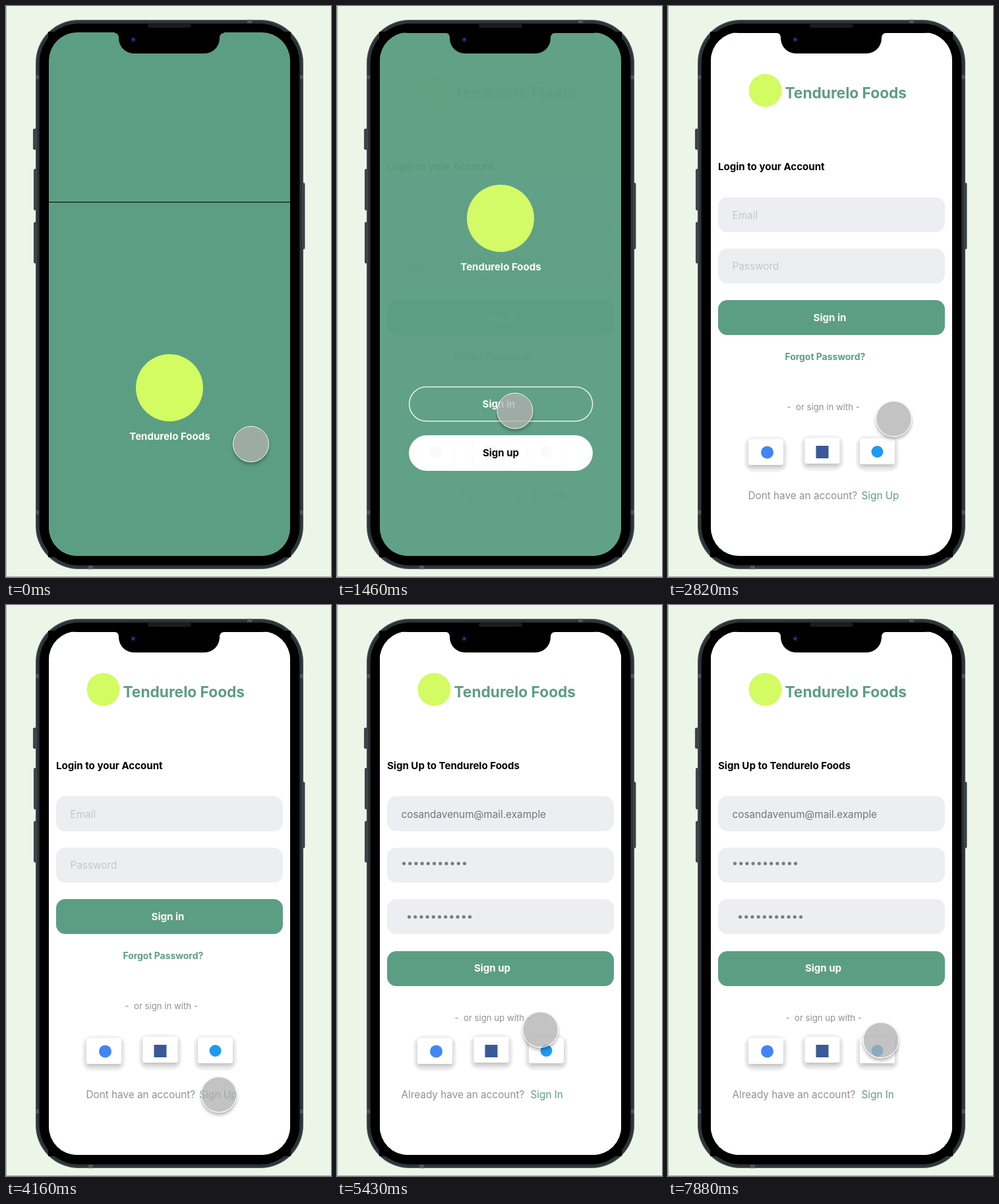
Animation of 493x866 px, one loop 8 s. Source, as an HTML page:

```html
<!DOCTYPE html>
<html lang="en">
<head>
<meta charset="utf-8">
<title>App sign-in walkthrough</title>
<style>
  html, body { margin: 0; width: 100%; height: 100%; overflow: hidden; background: #ecf6e8; }
  svg { display: block; position: absolute; left: 0; top: 0; }
  text { font: 400 15.3px Inter, sans-serif; white-space: pre; }
  .bold { font-size: 15.05px; font-weight: 700; }
  .brand { font-size: 22.7px; font-weight: 700; }
  .link { font-size: 13.9px; font-weight: 700; }
  .small { font-size: 13.2px; }
  .mid { text-anchor: middle; }
  .green { fill: #5c9e83; }
  .white { fill: #fff; }
  .grey { fill: #919191; }
  .hint { fill: #c6c6c6; }
  .typed { fill: #757575; }
  .field { fill: #edeef2; }
  .lime { fill: #d3fb62; }
  .dots { stroke: #7b7b7b; stroke-width: 5.2; stroke-linecap: round; stroke-dasharray: 0 9.2; }
  .card { fill: #fff; filter: drop-shadow(0 4px 3px rgba(0, 0, 0, .22)); }
  .halo { fill: #f4f4f4; }
  #pointer {
    position: absolute; left: -27.5px; top: -27.5px; width: 53px; height: 53px;
    border: 1px solid #fff; border-radius: 50%;
    background: rgba(177, 177, 177, .76); background-clip: padding-box;
    box-shadow: 0 4px 4px rgba(0, 0, 0, .25), 0 0 1px rgba(0, 0, 0, .3);
  }
</style>
</head>
<body>
<svg width="493" height="866" viewBox="0 0 493 866">
  <defs>
    <clipPath id="glass"><rect x="65" y="40" width="366" height="794" rx="43"/></clipPath>
    <g id="card">
      <rect class="halo" x="-6" y="-4" width="65" height="54" rx="15"/>
      <rect class="card" width="53" height="39" rx="3"/>
    </g>
    <g id="form">
      <rect class="white" x="65" y="41" width="366" height="794"/>
      <circle class="lime" cx="147.5" cy="128" r="25"/>
      <text class="brand green" x="177.5" y="139.5">Tendurelo Foods</text>
      <rect class="field" x="76" y="290" width="344" height="53" rx="14"/>
      <rect class="field" x="76" y="368" width="344" height="53" rx="14"/>
      <use href="#card" x="122" y="657"/>
      <use href="#card" x="207.5" y="655"/>
      <use href="#card" x="291" y="656"/>
      <circle cx="150.5" cy="677" r="9.5" fill="#4285f4"/>
      <rect x="224.5" y="667" width="19" height="19" fill="#3b5998"/>
      <circle cx="317.5" cy="676" r="9" fill="#1d9bf0"/>
    </g>
  </defs>

  <rect width="493" height="866" fill="#ecf6e8"/>
  <path d="M.5 0V865.5H493" fill="none" stroke="#a3a8a1"/>

  <g fill="#3a4247" stroke="#22292d" stroke-width=".7">
    <rect x="41.4" y="186.5" width="6" height="31" rx="1.5"/>
    <rect x="42.4" y="247.5" width="6" height="62" rx="1.5"/>
    <rect x="42.4" y="328" width="6" height="62" rx="1.5"/>
    <rect x="447" y="268.5" width="6" height="100" rx="1.5"/>
  </g>
  <rect x="45" y="21" width="406" height="833" rx="65" fill="#3f474c"/>
  <rect x="48.5" y="24.5" width="399" height="826" rx="61.5" fill="none" stroke="#2b3237" stroke-width="3"/>
  <path d="M45 108h5M446 108h5M45 768h5M446 768h5M366 23.5h7M125 851.5h7" stroke="#656d70" stroke-width="6" opacity=".6"/>
  <rect x="50.5" y="26.5" width="395" height="822" rx="59.5"/>
  <rect x="64" y="39" width="368" height="797"/>

  <g clip-path="url(#glass)">
    <rect class="green" x="65" y="40" width="366" height="795"/>

    <g id="welcome">
      <rect class="green" x="65" y="40" width="366" height="795"/>
      <rect x="65" y="40" width="366" height="1"/>
      <circle class="lime" cx="248" cy="322" r="51"/>
      <text class="bold white mid" x="248.5" y="401">Tendurelo Foods</text>
      <rect x="109.6" y="577.6" width="278" height="52" rx="26" fill="none" stroke="#fff" stroke-width="1.3"/>
      <text class="bold white mid" x="245.5" y="609">Sign in</text>
      <rect class="white" x="109" y="651" width="279" height="54" rx="27"/>
      <text class="bold mid" x="248.5" y="683.2">Sign up</text>
    </g>

    <g id="login">
      <use href="#form"/>
      <text class="bold" x="76" y="248.6">Login to your Account</text>
      <text class="hint" x="97.5" y="323">Email</text>
      <text class="hint" x="97.5" y="400">Password</text>
      <rect class="green" x="76" y="446" width="344" height="53" rx="14"/>
      <text class="bold white mid" x="245.5" y="478.2">Sign in</text>
      <text class="link green" x="177.5" y="537.3">Forgot Password?</text>
      <text class="small grey" x="180.5" y="612.6">-  or sign in with -</text>
      <text class="grey" x="121.5" y="748.3">Dont have an account?</text>
      <text class="green" x="293.5" y="748.3">Sign Up</text>
    </g>

    <g id="signup">
      <use href="#form"/>
      <text class="bold" x="76" y="248.6">Sign Up to Tendurelo Foods</text>
      <text class="typed" x="97.5" y="323">cosandavenum@mail.example</text>
      <rect class="field" x="76" y="446" width="344" height="53" rx="14"/>
      <path class="dots" d="M101.5 392h92.2M109.5 473h92.2"/>
      <rect class="green" x="76" y="525" width="344" height="53" rx="14"/>
      <text class="bold white mid" x="235.5" y="556.3">Sign up</text>
      <text class="small grey" x="178.5" y="631.4">-  or sign up with -</text>
      <text class="grey" x="97.5" y="748.3">Already have an account?</text>
      <text class="green" x="293.5" y="748.3">Sign In</text>
    </g>
  </g>

  <path d="M165 39h166v2q-7 0-7 8a23 23 0 0 1-23 23H194a23 23 0 0 1-23-23q0-8-6-8z"/>
  <rect x="215" y="27" width="66" height="6" rx="3" fill="#1a1b1c"/>
  <circle cx="193" cy="51" r="4.5" fill="#0a0e22"/>
  <circle cx="193" cy="51" r="2" fill="#2a3f96"/>
</svg>
<div id="pointer"></div>

<script>
  const LOOP = 8000, TICKS = 60, TICK = LOOP / TICKS, LEAD = 45, FADE = 300;
  const SCREEN_HEIGHT = 793;
  const SLIDE_START = -129, LOGIN_START = 1462, SIGNUP_START = 4200;

  // Pointer path: tick, x, y
  const path = [
    [0, 371, 664], [3, 371, 664], [5, 350, 654], [7, 305, 631], [9, 275, 616], [11, 269.5, 613.5],
    [14, 269.5, 613.5], [16, 300, 604], [19, 344, 597], [22, 341, 640], [25, 328, 715], [28, 322.5, 742],
    [31, 322.5, 742], [33, 314, 766], [36, 268, 715], [38, 242, 645], [39, 246, 620], [40, 272, 614],
    [41, 308, 643.5], [43, 323, 700], [46, 314, 757], [49, 314, 742],
    [52, 314, 742], [53, 321, 705], [55, 339, 585], [56, 338, 562], [57, 331, 590], [59, 322.5, 659.5]
  ];

  const el = id => document.getElementById(id);
  const [welcome, login, signup, pointer] = ['welcome', 'login', 'signup', 'pointer'].map(el);

  function easeOut(time, start) {
    const p = Math.min(1, Math.max(0, (time - start) / FADE));
    return 1 - (1 - p) ** 2;
  }

  function pointerAt(tick) {
    const i = path.findIndex(point => point[0] >= tick);
    if (i < 1) return path[0].slice(1);
    const [t0, x0, y0] = path[i - 1], [t1, x1, y1] = path[i];
    const p = (tick - t0) / (t1 - t0);
    return [x0 + (x1 - x0) * p, y0 + (y1 - y0) * p];
  }

  function draw(now) {
    const tick = Math.min(TICKS - 1, Math.floor((now % LOOP + LEAD) / TICK));
    const time = tick * TICK;
    const [x, y] = pointerAt(tick);
    const offset = Math.floor(SCREEN_HEIGHT * (1 - easeOut(time, SLIDE_START)));
    welcome.setAttribute('transform', `translate(0 ${offset})`);
    login.style.opacity = easeOut(time, LOGIN_START);
    signup.style.opacity = easeOut(time, SIGNUP_START);
    pointer.style.transform = `translate(${x}px, ${y}px)`;
  }

  const start = performance.now();
  function loop() {
    draw(performance.now() - start);
    requestAnimationFrame(loop);
  }
  loop();
</script>
</body>
</html>
```
